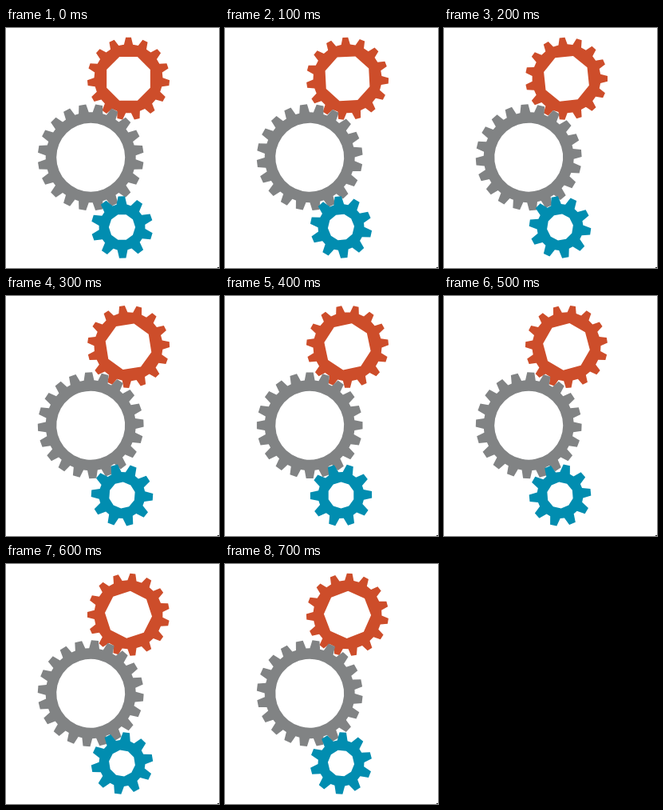
Recreate the animation shown at these times as an HTML page with a canvas. Size 267 px wide and 300 px high, loop 800 ms.

```html
<!DOCTYPE html>
<html lang="en">
<head>
<meta charset="utf-8">
<title>Gears</title>
<style>
  html, body { margin: 0; width: 100%; height: 100%; overflow: hidden; background: #fff; }
  canvas { display: block; }
</style>
</head>
<body>
<canvas id="stage" width="267" height="300"></canvas>
<script>
const ctx = document.getElementById('stage').getContext('2d');
const TAU = Math.PI * 2;
const LOOP = 800, STEPS = 8;

// tip and base are half widths of a tooth; phase is in teeth, clockwise from the top
const gears = [
  { x: 153.5, y: 63.3, outer: 51.5, root: 43, teeth: 15, tip: 3.4, base: 5.6,
    hole: 29.6, sides: 8, phase: 0, dir: -1, color: '#cd4d2a' },
  { x: 106.2, y: 161.7, outer: 66.3, root: 56.5, teeth: 20, tip: 4.5, base: 6.4,
    hole: 43, sides: 0, phase: 0.5, dir: 1, color: '#818384' },
  { x: 145.5, y: 249, outer: 38.6, root: 29, teeth: 10, tip: 4.2, base: 6.4,
    hole: 16.6, sides: 10, phase: -0.03, dir: -1, color: '#018db0' }
];

function addTooth(g, angle) {
  const c = Math.cos(angle), s = Math.sin(angle);
  const corner = (side, r) => ctx.lineTo(side * c + r * s, side * s - r * c);
  const foot = Math.sqrt(g.root ** 2 - g.base ** 2);
  corner(-g.base, foot);
  corner(-g.tip, g.outer);
  corner(g.tip, g.outer);
  corner(g.base, foot);
}

function addHole(g) {
  if (!g.sides) {
    ctx.moveTo(g.hole, 0);
    ctx.arc(0, 0, g.hole, 0, TAU);
    return;
  }
  for (let i = 0; i < g.sides; i++) {
    const a = (i + 0.5) / g.sides * TAU;
    const x = g.hole * Math.sin(a), y = -g.hole * Math.cos(a);
    if (i) ctx.lineTo(x, y);
    else ctx.moveTo(x, y);
  }
  ctx.closePath();
}

function drawGear(g, turn) {
  const pitch = TAU / g.teeth;
  ctx.save();
  ctx.translate(g.x, g.y);
  ctx.rotate(g.dir * turn * pitch);
  ctx.beginPath();
  for (let i = 0; i < g.teeth; i++) addTooth(g, (i + g.phase) * pitch);
  ctx.closePath();
  addHole(g);
  ctx.fillStyle = g.color;
  ctx.fill('evenodd');
  ctx.restore();
}

// each loop advances every gear by one tooth, in equal steps
function frame(now) {
  const turn = Math.floor(now % LOOP / LOOP * STEPS) / STEPS;
  ctx.fillStyle = '#fff';
  ctx.fillRect(0, 0, 267, 300);
  for (const g of gears) drawGear(g, turn);
  ctx.fillStyle = '#222';
  ctx.fillRect(265, 299, 2, 1);
  requestAnimationFrame(frame);
}
requestAnimationFrame(frame);
</script>
</body>
</html>
```
